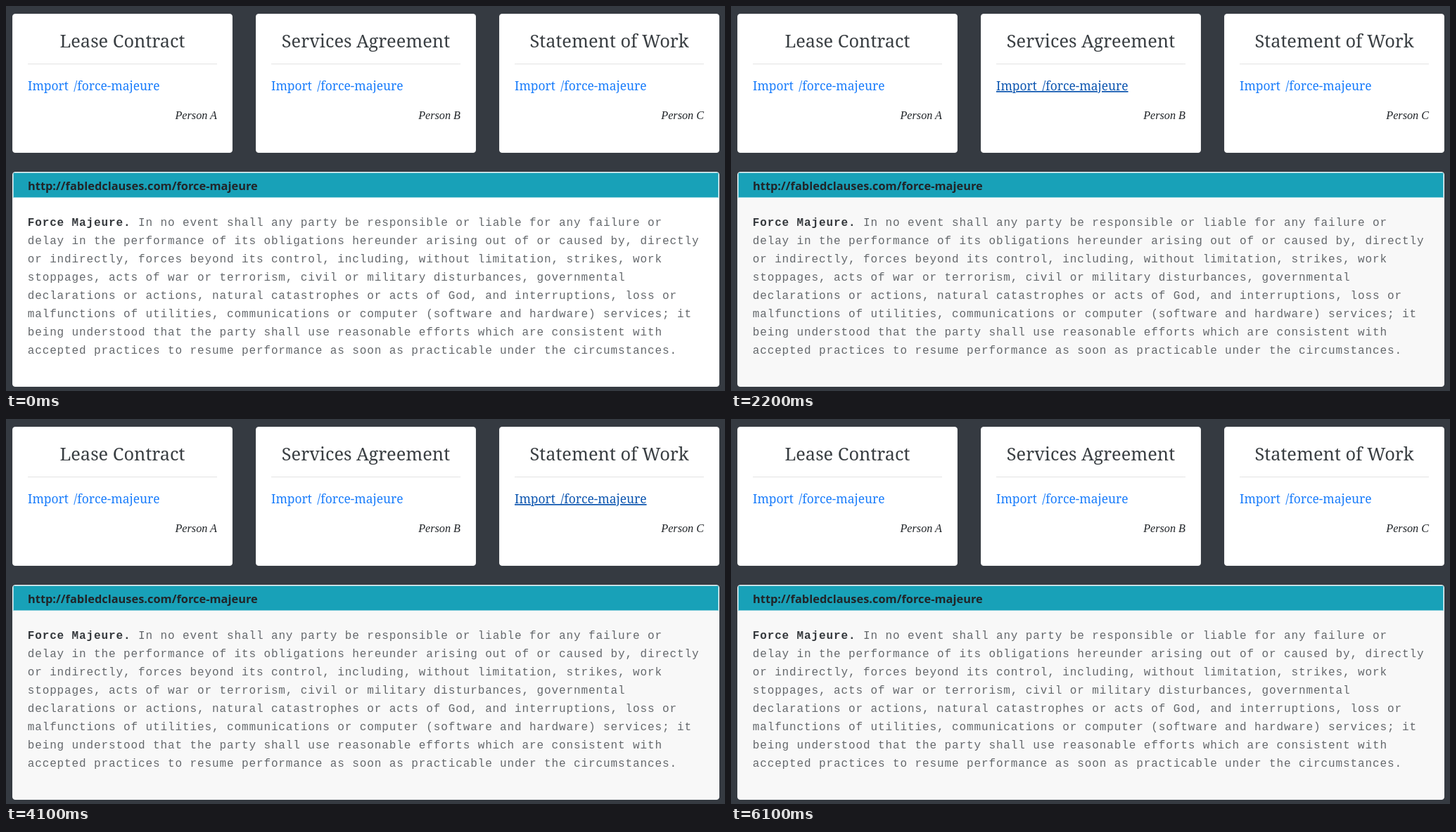
These frames come from a looping animation (1022 px wide and 548 px high, 7300 ms). An HTML page:

```html
<!DOCTYPE html>
<html lang="en">
<head>
<meta charset="utf-8">
<title>Shared clause</title>
<style>
  html, body {
    margin: 0;
    width: 100%;
    height: 100%;
    overflow: hidden;
    background: #353a41;
  }
  #stage {
    position: relative;
    width: 1022px;
    height: 548px;
    overflow: hidden;
  }
  #cards { position: absolute; inset: 0; }
  .card { fill: #fff; stroke: #f2f3f3; }
  .rule { fill: #e4e4e4; }
  .title {
    font: 25.4px "Noto Serif", serif;
    text-anchor: middle;
    fill: #3a3f43;
  }
  .link {
    font: 17.4px "Noto Serif", serif;
    word-spacing: 3px;
    fill: #1a7dfb;
  }
  .link.hover { fill: #0d56b0; text-decoration: underline; }
  .sign {
    font: italic 16.2px "Liberation Serif", serif;
    text-anchor: end;
    fill: #212529;
  }
  #panel {
    position: absolute;
    left: 9px;
    top: 236px;
    width: 1003px;
    border: 1px solid #f6f7f8;
    border-radius: 4px;
    background: #fff;
    overflow: hidden;
  }
  #panel.tint { background: #f8f8f8; }
  #head {
    box-sizing: border-box;
    height: 36px;
    padding-left: 20px;
    border: 1px solid #8cd0dc;
    background: #18a1b8;
    color: #212529;
    font: 700 16.4px/35px "Open Sans", "Noto Sans", sans-serif;
  }
  /* --p is how far the clause is open, from 0 to 1 */
  #body {
    box-sizing: border-box;
    width: calc(1003px * var(--p));
    height: calc(268px * var(--p));
    padding: calc(21.67px * var(--p));
    opacity: var(--p);
    overflow: hidden;
  }
  #body p {
    position: relative;
    left: -1px;
    top: 1px;
    margin: 0 -2px 0 0;
    color: #64686c;
    font: 16px/26px "Liberation Mono", monospace;
    letter-spacing: .89px;
  }
  #body b { color: #34383c; }
</style>
</head>
<body>
<div id="stage">
  <svg id="cards" width="1022" height="548"></svg>
  <div id="panel">
    <div id="head">http://fabledclauses.com/force-majeure</div>
    <div id="body">
      <p><b>Force Majeure.</b> In no event shall any party be responsible or
      liable for any failure or delay in the performance of its obligations
      hereunder arising out of or caused by, directly or indirectly, forces
      beyond its control, including, without limitation, strikes, work
      stoppages, acts of war or terrorism, civil or military disturbances,
      governmental declarations or actions, natural catastrophes or acts of
      God, and interruptions, loss or malfunctions of utilities,
      communications or computer (software and hardware) services; it being
      understood that the party shall use reasonable efforts which are
      consistent with accepted practices to resume performance as soon as
      practicable under the circumstances.</p>
    </div>
  </div>
</div>
<script>
  const LOOP = 7300;
  const STEP = 100;
  const FOLD = 366; // time to close, and again to open
  const clicks = [1081, 2909, 4781];
  const hovers = [[600, 2200], [2200, 4000], [4100, 6100]];
  const titles = ["Lease Contract", "Services Agreement", "Statement of Work"];

  const cards = document.getElementById("cards");
  const panel = document.getElementById("panel");
  const body = document.getElementById("body");

  cards.innerHTML = titles.map((title, i) => `
    <g transform="translate(${9 + 346 * i} 11)">
      <rect class="card" x=".5" y=".5" width="312" height="197" rx="3.5"/>
      <text class="title" x="156.5" y="48">${title}</text>
      <rect class="rule" x="22" y="71" width="269" height="1"/>
      <text class="link" x="22" y="109">Import /force-majeure</text>
      <text class="sign" x="291" y="150">Person ${"ABC"[i]}</text>
    </g>`).join("");
  const links = cards.querySelectorAll(".link");

  // Closes after a click, then opens again, both with sine easing.
  function openness(t) {
    const start = clicks.find(c => t > c && t < c + 2 * FOLD);
    return start === undefined ? 1 : (1 + Math.cos(Math.PI * (t - start) / FOLD)) / 2;
  }

  function draw() {
    const now = (performance.now() + 0.5) % LOOP;
    const t = Math.floor(now / STEP) * STEP;
    const p = openness(t);
    body.style.setProperty("--p", p.toFixed(4));
    panel.classList.toggle("tint", t >= 1200 && p > 0.1);
    links.forEach((link, i) => {
      const [on, off] = hovers[i];
      link.classList.toggle("hover", t >= on && t < off);
    });
    requestAnimationFrame(draw);
  }
  draw();
</script>
</body>
</html>
```
